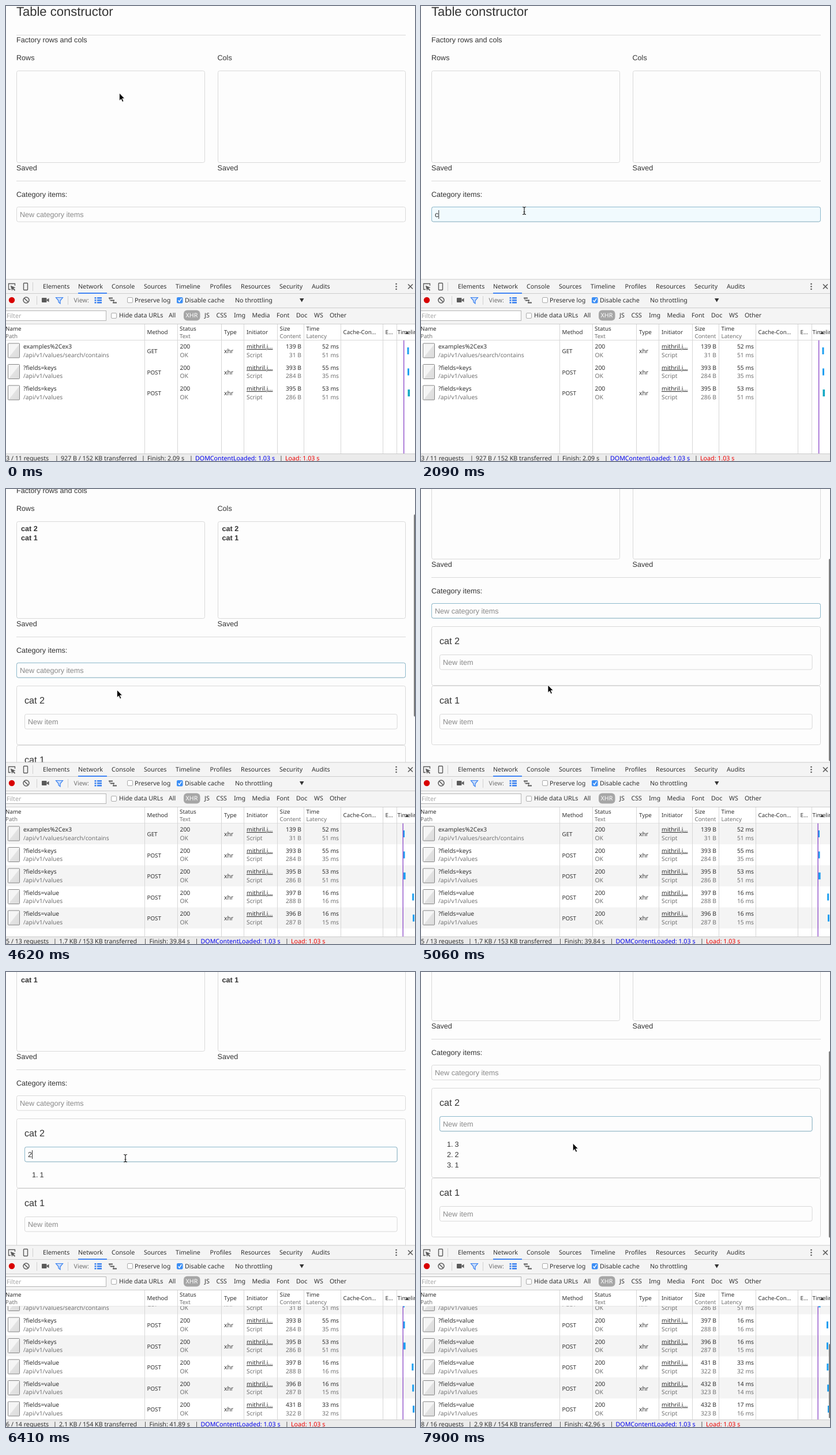
Recreate the animation shown at these times as an HTML page. Size 709 by 789 pixels, loop 8 s.

```html
<!DOCTYPE html>
<html lang="en">
<head>
<meta charset="utf-8">
<title>Table constructor</title>
<style>
  html, body { margin: 0; width: 100%; height: 100%; overflow: hidden; background: #fdfdfd; }
  svg { display: block; }
  text { white-space: pre; text-rendering: geometricPrecision; }
  #page text { font: 12.6px "Liberation Sans", Arial, sans-serif; fill: #333; }
  #page .title { font-size: 22px; }
  #page .head { font-size: 16.2px; }
  #page .bold { font-weight: bold; }
  #page .hint { fill: #898989; }
  #tools text { font: 10.7px "Noto Sans", "Open Sans", sans-serif; fill: #303030; }
  #tools .col { font-size: 9.8px; }
  #tools .row { font-size: 10.3px; }
  #tools .dim { fill: #707070; }
  #tools .off { fill: #a5a5a5; }
  #tools .lit { fill: #fff; }
  #tools .end { text-anchor: end; }
  #tools .link { text-decoration: underline; }
  #tools .dom { fill: #00e; }
  #tools .load { fill: #e00; }
</style>
</head>
<body>
<svg id="stage" width="709" height="789" viewBox="0 0 709 789">
  <defs>
    <linearGradient id="sheet" x1="0" y1="0" x2="1" y2="1">
      <stop offset=".5" stop-color="#f5f5f5"/><stop offset=".54" stop-color="#e2e2e2"/><stop offset="1" stop-color="#dcdcdc"/>
    </linearGradient>
  </defs>
  <svg id="page" width="709" height="474"></svg>
  <g id="tools">
    <g id="bars"></g>
    <svg id="table" y="579.5" width="709" height="196.5"></svg>
    <g id="grid"></g>
    <g id="status"></g>
  </g>
  <g id="pointer">
    <path id="arrow" d="M0 0V13.2L3 10.4L5.2 15.3L7.4 14.3L5.2 9.5H9.2Z" fill="#000" stroke="#fff" stroke-width=".8"/>
    <path id="beam" d="M-3-6.5Q0-6.5 0-4.5Q0-6.5 3-6.5M0-5V5M-3 6.5Q0 6.5 0 4.5Q0 6.5 3 6.5M-1.5 2H1.5" fill="none" stroke="#222" stroke-width="1.2"/>
  </g>
</svg>
<script>
const LOOP = 8000, STEP = 148.9;
const $ = id => document.getElementById(id);
const ruler = document.createElement('canvas').getContext('2d');
ruler.font = '12.6px "Liberation Sans", Arial, sans-serif';

// Drawing helpers
const text = (x, y, s, cls = '') => `<text x="${x}" y="${y}" class="${cls}">${s}</text>`;
const rect = (x, y, w, h, fill, more = '') =>
  `<rect x="${x}" y="${y}" width="${w}" height="${h}" fill="${fill}" ${more}/>`;
const frame = (x, y, w, h, color = '#d9d9d9', more = '') =>
  rect(x + .5, y + .5, w - 1, h - 1, 'none', `rx="3" stroke="${color}" ${more}`);
const path = (d, color, width = 1, fill = 'none') =>
  `<path d="${d}" fill="${fill}" stroke="${color}" stroke-width="${width}"/>`;

// Interpolates rows of [tick, value, ...] at tick k
function at(keys, k, col = 1) {
  const i = keys.findIndex(p => p[0] > k);
  if (i < 0) return keys[keys.length - 1][col];
  if (i === 0) return keys[0][col];
  const a = keys[i - 1], b = keys[i];
  let u = (k - a[0]) / (b[0] - a[0]);
  u = u * u * (3 - 2 * u);
  return a[col] + (b[col] - a[col]) * u;
}
// Last value whose tick has been reached
const last = (keys, k) => keys.filter(p => p[0] <= k).pop()[1];

const mouse = [[1, 196.5, 151], [7, 179, 355], [18, 179, 355], [19, 177.5, 353], [29, 177.5, 353],
  [34, 220, 340], [37, 207, 323], [48, 207, 323], [53, 263.3, 297]];
const scrolls = [[29, 0], [34, 159], [36, 147], [37, 143], [48, 143], [53, 196]];
const catText = [[0, ''], [14, 'c'], [15, 'ca'], [16, 'cat'], [17, 'cat 1'], [19, ''],
  [20, 'c'], [21, 'ca'], [22, 'cat'], [23, 'cat '], [26, 'cat 2'], [29, '']];
const itemText = [[0, ''], [41, '1'], [42, ''], [43, '2'], [44, ''], [45, '3'], [48, '']];
const catFocus = [[7, 0], [9, 1], [37, 1], [39, 0]];
const itemFocus = [[37, 0], [39, 1]];
const catCount = [[0, 0], [19, 1], [29, 2]];
const itemCount = [[0, 0], [42, 1], [44, 2], [48, 3]];
const totals = [
  [0, ['3 / 11', '927 B / 152', '2.09']],
  [19, ['4 / 12', '1.3 KB / 153', '38.35']],
  [29, ['5 / 13', '1.7 KB / 153', '39.84']],
  [42, ['6 / 14', '2.1 KB / 154', '41.89']],
  [44, ['7 / 15', '2.5 KB / 154', '42.41']],
  [48, ['8 / 16', '2.9 KB / 154', '42.96']]];
const requests = [
  ['keys', 139, 31, 52, 51], ['keys', 393, 284, 55, 35], ['keys', 395, 286, 53, 51],
  ['value', 397, 288, 16, 16], ['value', 396, 287, 16, 15], ['value', 431, 322, 33, 32],
  ['value', 432, 323, 14, 14], ['value', 432, 323, 17, 16]];

function field(x, y, w, value, hint, focus, caret, tint = 0) {
  const h = 26.6;
  let s = rect(x + .5, y + .5, w - 1, h - 1, '#effaff', `rx="3" fill-opacity="${tint * .8}"`) + frame(x, y, w, h);
  if (focus) s += frame(x, y, w, h, '#8cb9cc', `stroke-opacity="${focus}"`);
  s += value ? text(x + 6, y + 18, value) : text(x + 6, y + 18, hint, 'hint');
  if (caret) s += rect(x + 6 + ruler.measureText(value).width, y + 6, 1, 15, '#333');
  return s;
}

function card(y, name, items, value, focus, caret) {
  let s = frame(18, y, 675, Math.round(103 + 17.8 * items)) + text(32, y + 31, name, 'head') +
    field(32, y + 49, 646.6, value, 'New item', focus, caret);
  for (let i = 0; i < items; i++)
    s += text(45, y + 102 + 17.8 * i, `${i + 1}.`) + text(58.5, y + 102 + 17.8 * i, items - i);
  return s;
}

function drawPage(k) {
  const cats = last(catCount, k), items = last(itemCount, k), scroll = at(scrolls, k);
  const grow = cats ? 9 : 0, typed = last(catText, k), entry = last(itemText, k);
  let s = text(18, 17, 'Table constructor', 'title') + text(18, 63, 'Factory rows and cols') +
    rect(18, 50, 675, 1, '#d9d9d9');
  [['Rows', 18, 327], ['Cols', 366.5, 326.5]].forEach(([name, x, w]) => {
    s += text(x, 94, name) + frame(Math.round(x), 112, Math.floor(w), 160 + grow) + text(x, 285 + grow, 'Saved');
    if (cats) s += text(x + 8, 129, `cat ${cats}`, 'bold');
    if (cats > 1) s += text(x + 8, 144.5 + 16 * items, 'cat 1', 'bold');
  });
  s += rect(18, 303 + grow, 675, 1, '#d9d9d9') + text(18, 330.5 + grow, 'Category items:') +
    field(18, 348 + grow, 675, typed, 'New category items', at(catFocus, k),
      typed || k >= 10 && k < 14, k < 19 ? at(catFocus, k) : 0);
  if (cats === 1) s += card(397, 'cat 1', 0, '');
  if (cats === 2) s += card(397, 'cat 2', items, entry, at(itemFocus, k), entry || k >= 38 && k <= 40) +
    card(Math.round(500 + 17.8 * items), 'cat 1', 0, '');
  s = rect(0, 0, 709, 474, '#fdfdfd') + `<g transform="translate(0 ${-scroll})">${s}</g>`;
  if (k >= 30 && k <= 38 || k >= 49) {
    const full = 633 + 17.8 * items;
    s += rect(707, scroll / full * 474 + 2, 5, 474 * 474 / full - 4, '#7d7d7d', 'rx="2"');
  }
  $('page').innerHTML = s;
}

function drawTable(k) {
  const n = 3 + last(catCount, k) + last(itemCount, k), h = 36.5;
  const scroll = Math.max(0, n * h - 196.5), early = n === 3;
  let s = rect(0, 0, 709, 197, '#fff');
  requests.slice(0, n).forEach(([kind, size, body, time, wait], i) => {
    const y = i * h - scroll;
    const cell = (x, a, b, cls = '') => text(x, y + 14.5, a, 'row ' + cls) + text(x, y + 29, b, 'row dim ' + cls);
    const bar = i > 2 ? Math.max(703, 705 - .8 * (n - 1 - i)) : (early ? 695.5 : 688) + (i === 2 ? 1 : i * .5);
    if (!early && i % 2 === 0) s += rect(0, y, 709, h, '#f4f4f4');
    s += rect(3.5, y + 5.5, 20, 25, 'url(#sheet)', 'rx="1" stroke="#858585"') +
      cell(30, i ? '?fields=' + kind : 'examples%2Cex3', '/api/v1/values' + (i ? '' : '/search/contains')) +
      text(244.5, y + 22.5, i ? 'POST' : 'GET', 'col') + cell(301.5, '200', 'OK') + text(378, y + 22.5, 'xhr', 'row') +
      text(417, y + 14.5, 'mithril.j…', 'row link') + text(417, y + 29, 'Script', 'row dim') +
      cell(512, size + ' B', body + ' B', 'end') + cell(577, time + ' ms', wait + ' ms', 'end') +
      rect(bar, y + 12.5, i === 2 ? 3.6 : 3, 12, early && i === 2 ? '#14a9c4' : '#1b9ff1');
  });
  s += rect(early ? 689 : 687.5, 0, 1.3, 197, '#8a46c8');
  if (k >= 48) s += rect(707, scroll / (n * h) * 196.5 + 1, 5, 196.5 * 196.5 / (n * h) - 3, '#7d7d7d', 'rx="2"');
  $('table').innerHTML = s;

  const [count, size, finish] = last(totals, k);
  const xs = early ? [0, 95, 245, 328, 484] : [0, 92, 248.5, 337.5, 494];
  const parts = [count + ' requests', size + ' KB transferred', `Finish: ${finish} s`,
    'DOMContentLoaded: 1.03 s', 'Load: 1.03 s'];
  $('status').innerHTML = rect(0, 776, 709, 13, '#ebebeb') + rect(0, 776, 709, 1, '#ccc') +
    parts.map((p, i) => (i ? text(xs[i] - 10, 787.7, '|') : '') +
      text(xs[i], 787.7, p, ['', '', '', 'dom', 'load'][i])).join('');
}

function drawBars() {
  const gray = '#5a5a5a', blue = '#3b82f0';
  const labels = (y, list) => list.map(([x, s]) => text(x, y, s)).join('');
  const box = (x, y) => rect(x + .5, y + .5, 9, 9, '#fff', 'rx="1.5" stroke="#aaa"');
  let s = rect(0, 474, 709, 78, '#f4f4f4') + rect(0, 552, 709, 28, '#fff');
  for (const y of [473.5, 498, 523, 551, 579]) s += rect(0, y, 709, 1, '#cdcdcd');
  for (const x of [46, 53, 107]) s += rect(x, x === 46 ? 479 : 503, 1, 15, '#d0d0d0');

  s += path('M8 491.5H4.5V481.5H15.5V485', gray, 1.3) + path('M8 485L16 488.3L12.8 489.3L16 492.5L14.7 493.6L11.6 490.5L10.5 493.5Z', gray, .4, gray) +
    rect(30.5, 480.5, 7, 12, 'none', `rx="1" stroke="${gray}" stroke-width="1.4"`) +
    rect(125, 497, 50, 2, '#4285f4') + path('M697 482.5L705 490.5M705 482.5L697 490.5', gray, 1.6);
  for (const y of [482, 486.5, 491]) s += `<circle cx="676.5" cy="${y}" r="1.3" fill="${gray}"/>`;
  s += labels(490.2, [[64, 'Elements'], [125, 'Network'], [183, 'Console'], [239, 'Sources'], [294, 'Timeline'],
    [353.5, 'Profiles'], [407, 'Resources'], [474, 'Security'], [530, 'Audits']]);

  s += '<circle cx="10" cy="510" r="5.2" fill="#d90000"/>' +
    `<circle cx="35" cy="510" r="5" fill="none" stroke="${gray}" stroke-width="1.5"/>` + path('M31.5 506.5L38.5 513.5', gray, 1.5) +
    rect(62, 506, 8.5, 8, gray, 'rx="1"') + path('M70 510L74.5 506.5V513.5Z', gray, 0, gray) +
    path('M86.5 505.5H98.5L94 511V516L91 513.5V511Z', blue, 1.2, '#c8dcfb') +
    text(117.5, 514.3, 'View:', 'dim');
  for (const y of [505, 509, 513])
    s += rect(153.5, y, 3, 2.6, blue) + rect(158, y, 8, 2.6, blue);
  s += path('M178 506.5H185M181 510.5H188M185 514.5H192', gray, 2) + path('M180 506V510.5M186.5 510V514.5', gray, .8) +
    box(210, 505) + rect(296, 505, 10.5, 10.5, '#3b8ef5', 'rx="2"') + path('M298.5 510.5L300.6 512.8L304.3 507.2', '#fff', 1.5) +
    labels(514.3, [[223, 'Preserve log'], [310, 'Disable cache'], [397, 'No throttling']]) +
    path('M509 507H516.5L512.7 513.5Z', '#333', 0, '#333');

  s += rect(-2.5, 528.5, 176, 17, '#fff', 'stroke="#b5b5b5"') + text(1, 540.5, 'Filter', 'off') + box(182, 532) +
    rect(308, 527.5, 28.5, 18, '#a6a6a6', 'rx="6"') + text(311.5, 540.2, 'XHR', 'lit') +
    labels(540.2, [[196, 'Hide data URLs'], [282, 'All'], [344, 'JS'], [364.5, 'CSS'], [395, 'Img'], [426.5, 'Media'],
      [469, 'Font'], [503, 'Doc'], [534, 'WS'], [561, 'Other']]);

  for (const [x, a, b] of [[-1, 'Name', 'Path'], [301, 'Status', 'Text'], [474.5, 'Size', 'Content'], [520.5, 'Time', 'Latency']])
    s += text(x, 562.7, a, 'col') + text(x, 575.5, b, 'col dim');
  for (const [x, a] of [[244.5, 'Method'], [378, 'Type'], [417, 'Initiator'], [584.5, 'Cache-Con…'], [657.5, 'E…'], [678.5, 'Timeline']])
    s += text(x, 569, a, 'col');
  s += path('M692 569L695 563.5L698 569Z', '#444', 0, '#444');
  $('bars').innerHTML = s;
  $('grid').innerHTML = [240, 297, 373, 412, 470, 516, 580, 653, 677]
    .map(x => rect(x, 552, 1, 224, '#d6d6d6')).join('');
}

let shown = -1;
function tick(now) {
  const k = Math.floor((now % LOOP + 4) / STEP);
  if (k !== shown) {
    shown = k;
    drawPage(k);
    drawTable(k);
    const beam = k >= 7 && k < 19 || k >= 37 && k < 49;
    $('beam').style.display = beam ? '' : 'none';
    $('arrow').style.display = beam ? 'none' : '';
    $('pointer').setAttribute('transform', `translate(${at(mouse, k, 1)} ${at(mouse, k, 2)})`);
  }
}

drawBars();
tick(0);
let start;
requestAnimationFrame(function loop(now) {
  start ??= now;
  tick(now - start);
  requestAnimationFrame(loop);
});
</script>
</body>
</html>
```
